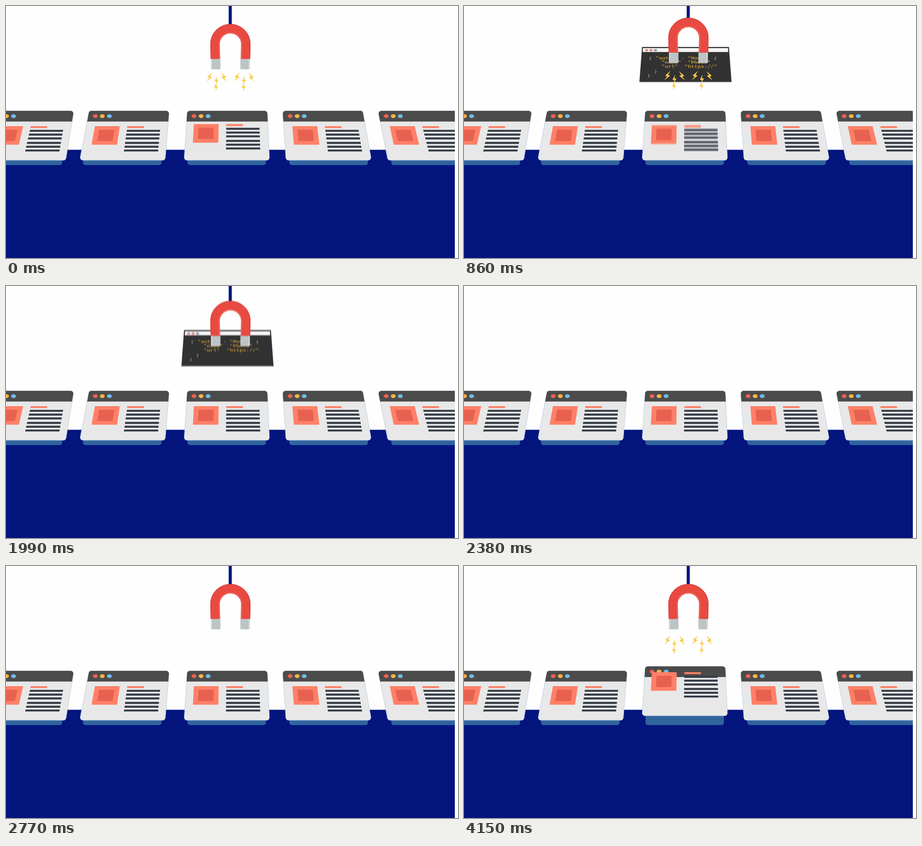
Write an HTML page with a canvas that moves like this. It is 1000 by 560 pixels and loops after 4.25 s.

```html
<!DOCTYPE html>
<html lang="en">
<head>
<meta charset="utf-8">
<title>Magnet and pages</title>
<style>
  html, body { margin: 0; width: 100%; height: 100%; overflow: hidden; background: #fff; }
  canvas { display: block; }
</style>
</head>
<body>
<canvas id="stage" width="993" height="560"></canvas>
<script>
const W = 993, H = 560, LOOP = 4250, CYCLE = 3730;
const EXIT = 1990; // the magnet starts to leave
const SHUTTER = 14, SAMPLES = 9;
const NAVY = '#04157e', CORAL = '#fe8067', RED = '#e86150', INK = '#343b46', YELLOW = '#fdcb4b';

const out = document.getElementById('stage').getContext('2d');
const layer = document.createElement('canvas');
layer.width = W;
layer.height = H;
const g = layer.getContext('2d');

const clamp = x => Math.max(0, Math.min(1, x));
const mix = (a, b, x) => a + (b - a) * x;
const ramp = (t, from, to) => clamp((t - from) / (to - from));
const ease = (t, from, to) => { const x = ramp(t, from, to); return x * x * (3 - 2 * x); };

function rect(x, y, w, h, color, radius = 0) {
  g.beginPath();
  g.roundRect(x, y, w, h, radius);
  g.fillStyle = color;
  g.fill();
}

function ellipse(x, y, rx, ry, color) {
  g.beginPath();
  g.ellipse(x, y, rx, ry, 0, 0, 7);
  g.fillStyle = color;
  g.fill();
}

function polygon(points, color) {
  g.beginPath();
  points.forEach(([x, y]) => g.lineTo(x, y));
  g.closePath();
  g.fillStyle = color;
  g.fill();
}

const trapezoid = (center, half1, y1, half2, y2, color) =>
  polygon([[center - half1, y1], [center + half1, y1],
           [center + half2, y2], [center - half2, y2]], color);

function roundedPath(points, radius) {
  const n = points.length, [a, b] = [points[n - 1], points[0]];
  g.beginPath();
  g.moveTo((a[0] + b[0]) / 2, (a[1] + b[1]) / 2);
  points.forEach((p, i) => g.arcTo(...p, ...points[(i + 1) % n], radius));
  g.closePath();
}

// Pages stand on a conveyor; slot 0 is below the magnet.
function drawPage(slot, lift, contentLift) {
  const top = 489.5 + 211 * slot - 6 * clamp(-slot);
  const bottom = 488.5 + 225.5 * slot - 5.5 * clamp(1 - Math.abs(slot + 1));
  const left = y => mix(top - 88.5, bottom - 94.5, (y - 233) / 110);
  const width = y => mix(177, 189, (y - 233) / 110);
  const nudge = 2.5 * clamp(Math.abs(slot));
  const block = (u1, u2, y1, y2, color) => {
    const at = (u, y) => [left(y) + u * width(y) + nudge, y - contentLift];
    polygon([at(u1, y1), at(u2, y1), at(u2, y2), at(u1, y2)], color);
  };

  rect(bottom - 87, 326, 173.5, 27.5, '#30649d', 5);

  g.save();
  g.translate(0, -lift);
  roundedPath([[top - 88.5, 233], [top + 88.5, 233],
               [bottom + 94.5, 342.8], [bottom - 94.5, 342.8]], 6);
  g.fillStyle = '#e8e8e8';
  g.fill();
  g.strokeStyle = '#b9cfe8';
  g.lineWidth = 1;
  g.stroke();
  g.clip();
  rect(top - 110, 232, 220, 24.7, '#4c4b4b');
  ['#e8624f', '#f8b249', '#71b9e6'].forEach((color, i) =>
    ellipse(left(245) + 15.8 + 15.6 * i, 244.8, 5.4, 4.2, color));
  g.restore();

  block(.093, .397, 267, 308.3, CORAL);
  block(.152, .338, 275, 300, RED);
  block(.49, .693, 267, 271.3, CORAL);
  for (let i = 0; i < 6; i++) {
    const y = 275.2 + 8.4 * i + (i > 2 ? 1.7 : 0);
    block(.49, .895, y, y + 4.4, INK);
  }
}

const CODE = [['"auto"', 424, '"Mode"', 495], ['"name"', 437, '"Photo"', 495], ['"url"', 437, '"https://"', 488]];

function drawPanel(top, height) {
  const squash = .78;
  g.save();
  g.translate(0, top);
  g.scale(1, height / 81);
  trapezoid(490, 96, 0, 102, 81, '#a9a9a9');
  trapezoid(490, 96, 0, 101.8, 79.5, '#323232');
  trapezoid(490, 94, 2.5, 94.5, 11.5, '#f6f6f6');
  ['#dc9a94', '#e28f87', '#98a2ad'].forEach((color, i) =>
    ellipse(404 + 9.8 * i, 7.5, 3.6, 3, color));

  g.scale(1, squash);
  g.textBaseline = 'middle';
  const write = (text, x, y) => g.fillText(text, x, y / squash);
  g.font = 'bold 12px "Liberation Mono", monospace';
  g.fillStyle = '#c4943a';
  CODE.forEach(([key, keyX, value, valueX], i) => {
    write(key, keyX, 26 + 9.7 * i);
    write(value, valueX, 26 + 9.7 * i);
  });
  g.font = '10px "Liberation Mono", monospace';
  g.fillStyle = '#d8d8d8';
  write('{', 409, 26);
  write('{', 553, 26);
  write(':', 481, 26);
  write('}', 421, 56);
  write('}', 406, 65.5);
  g.restore();
}

function arch(radius, width, color) {
  g.beginPath();
  g.moveTo(497.3 - radius, 118);
  g.lineTo(496.5 - radius, 84.5);
  g.arc(496.5, 84.5, radius, Math.PI, 0);
  g.lineTo(495.7 + radius, 118);
  g.lineWidth = width;
  g.strokeStyle = color;
  g.stroke();
}

function drawMagnet(offset) {
  g.save();
  g.translate(0, offset);
  rect(492, -400, 8.4, 442, '#a9b5cf');
  rect(493, -400, 6.2, 442, NAVY);
  arch(34, 21, '#e84a41');
  arch(43.6, 1.6, '#d9443c');
  arch(25.2, 1.8, '#ed6a60');
  for (const side of [-1, 1]) {
    rect(486 + 32.5 * side, 117.8, 21, 23, '#bcc4c6', [0, 0, 2, 2]);
    rect(495.2 + 41.5 * side, 117.8, 2.5, 22, '#d5d9dd');
  }
  g.restore();
}

function bolt(x, y, scaleX, scaleY, angle = 0) {
  g.save();
  g.translate(x, y);
  g.scale(scaleX, scaleY);
  g.rotate(angle);
  polygon([[7, -10.5], [-5, 0], [-.5, 2], [-7, 10.5], [6, .5], [1.5, -1.5]], YELLOW);
  g.restore();
}

function drawBolts(offset) {
  for (const x of [466.2, 527]) {
    const y = 157.5 + offset;
    bolt(x - 16.2, y, 1, 1);
    bolt(x + 16.2, y + .5, -1, 1);
    bolt(x - 1, y + 8, .9, .8, -.45);
    bolt(x - 1.8, y + 22.5, .9, .8, -.45);
  }
}

function magnetOffset(t) {
  if (t > 2350) return -.0042 * Math.max(0, 2697 - t) ** 2;
  const recoil = ease(t, 720, 840) - ease(t, 840, 1120);
  return -14 * recoil - .0022 * Math.max(0, t - EXIT + 56) ** 2;
}

function drawScene(t) {
  rect(0, 0, W, H, '#fefefe');
  rect(0, 319.5, W, H, NAVY);

  const shift = ramp(t, 2447, 2739);
  const lift = 10 * (ease(t, 150, 420) - ease(t, 590, 780));
  const contentLift = 31 * ease(t, -135, 425) * (1 - ramp(t, 670, 845) ** 2);
  for (let k = -3; k <= 2; k++) {
    drawPage(k + shift, k ? 0 : lift, k ? 0 : contentLift);
  }

  const offset = magnetOffset(t);
  if (t > 540 && t < 2350) {
    drawPanel(mix(225, 105 + offset, ease(t, 540, 830)), mix(40, 81, ease(t, 540, 890)));
  }
  drawMagnet(offset);
  if (t < 1100) drawBolts(7 * ramp(t, 0, 420) - 10 * ramp(t, 440, 840));
}

// Averages several moments around t for motion blur.
function expose(t) {
  for (let i = 0; i < SAMPLES; i++) {
    drawScene(t + SHUTTER * (i / (SAMPLES - 1) - .5));
    out.globalAlpha = 1 / (i + 1);
    out.drawImage(layer, 0, 0);
  }
}

// The picture advances in even steps, a little faster from the exit on.
function hold(t) {
  const [start, step] = t < EXIT ? [0, 140] : [EXIT, 126];
  return start + Math.floor((t - start) / step) * step;
}

let shown = -1;
function tick() {
  const t = hold(performance.now() % LOOP % CYCLE);
  if (t !== shown) expose(shown = t);
  requestAnimationFrame(tick);
}
tick();
</script>
</body>
</html>
```
